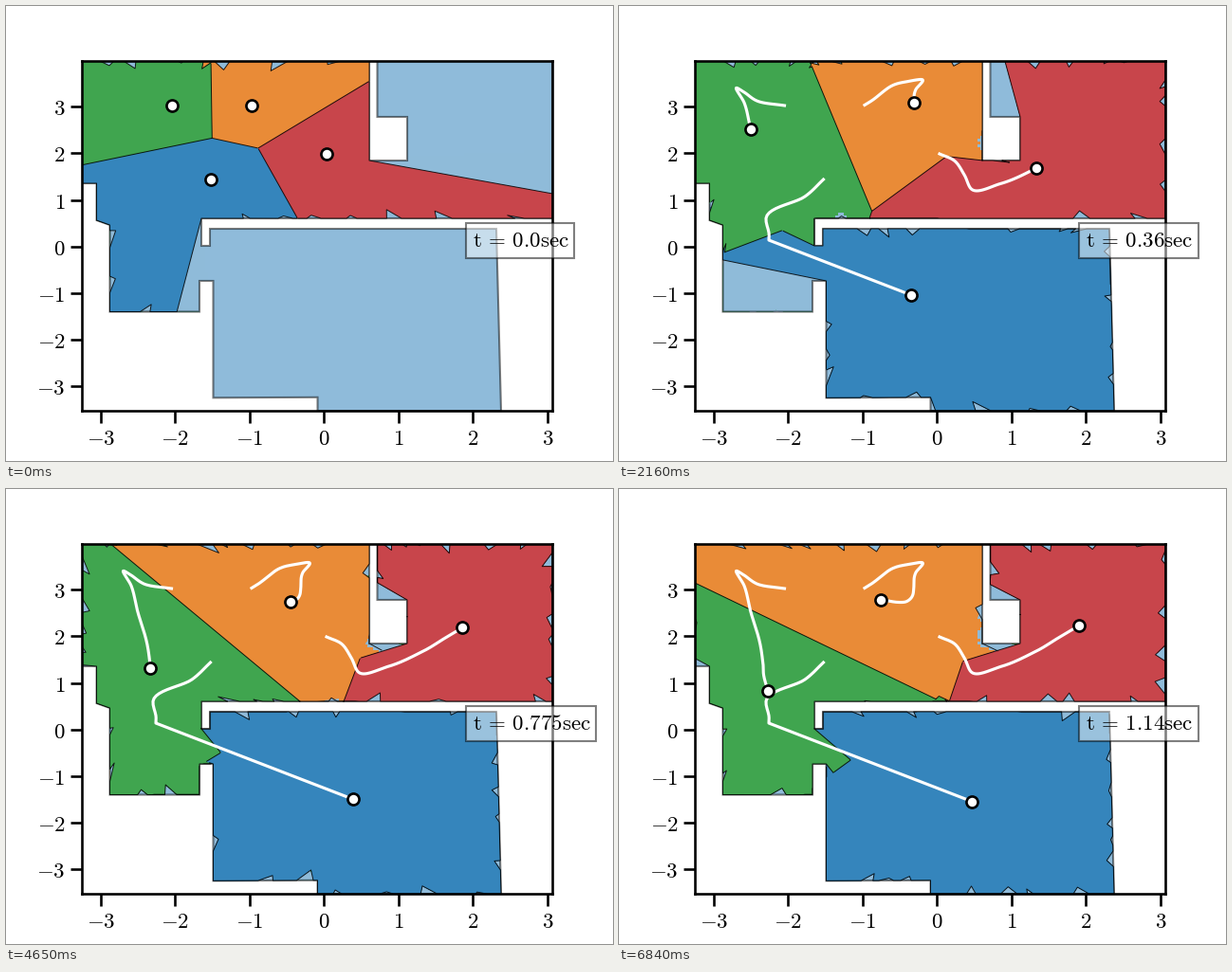
A matplotlib script that plays this animation: 640x480 px, repeating every 6.87 s.

```python
from itertools import combinations

import matplotlib.pyplot as plt
import numpy as np
from matplotlib.animation import FuncAnimation
from matplotlib.collections import PolyCollection
from matplotlib.colors import to_rgb
from matplotlib.patches import Polygon, Rectangle

plt.rcParams["mathtext.fontset"] = "cm"

FRAMES, INTERVAL, DT = 229, 30, 0.005
ORIGIN = np.array([335.3, 253.8])
UNIT = np.array([78.5, 49.2])   # pixels per data unit
LEFT, TOP, RIGHT, BOTTOM = 80, 57.6, 576, 427.2
BLUR = 0.02                     # angle lost beside each corner
STEP = 3                        # spacing of the coarse grid

ROOM = np.array([
    (LEFT, 187), (95.5, 187), (95.5, 226), (109.5, 231), (109.5, 322.5),
    (204, 322.5), (204, 290), (218.5, 290), (218.5, 413.3), (328.5, 412.8),
    (328.5, BOTTOM), (522, BOTTOM), (517, 235), (215, 235), (215, 253),
    (206, 253), (206, 224), (RIGHT, 224), (RIGHT, TOP), (391.5, TOP),
    (391.5, 117), (423, 117), (423, 163), (383, 163), (383, TOP), (LEFT, TOP)])


def mix(top, under, alpha):
    return tuple(alpha * np.array(to_rgb(top)) + (1 - alpha) * np.array(to_rgb(under)))


FLOOR = mix("tab:blue", "white", 0.5)
COLORS = [mix("tab:" + c, FLOOR, 0.8) for c in ("blue", "orange", "green", "red")]


def path(*keys):
    """Cubic Hermite curve through (step, x, y) keys, one point per step."""
    k = np.array(keys, float)
    t, xy = k[:, 0], k[:, 1:]
    slope = np.gradient(xy, t, axis=0)
    n = np.arange(FRAMES)
    i = np.clip(np.searchsorted(t, n, "right") - 1, 0, len(t) - 2)
    h = (t[i + 1] - t[i])[:, None]
    u = (n - t[i])[:, None] / h
    return ((1 + 2 * u) * (1 - u) ** 2 * xy[i] + u * (1 - u) ** 2 * h * slope[i]
            + u * u * (3 - 2 * u) * xy[i + 1] + u * u * (u - 1) * h * slope[i + 1])


def settle(curve, start, goal, tau):
    """From step start on, close in on the goal exponentially."""
    left = np.exp(-np.arange(FRAMES - start) / tau)[:, None]
    curve[start:] = goal + (curve[start] - goal) * left
    return curve


blue = settle(path((0, 215.5, 183), (9, 196, 201), (20, 155, 224),
                   (24, 158, 239), (28, 158, 247), (FRAMES, 373, 330)),
              28, np.array([373, 330]), 37)
orange = path((0, 259, 104.5), (5, 267, 99.5), (15, 287, 84.5), (25, 305, 79.5),
              (32, 319, 77.5), (45, 313, 88), (72, 311, 102), (97, 310, 111),
              (134, 304.5, 118), (177, 294.5, 119.5), (228, 275.5, 116.5))
green = path((0, 174.5, 105), (11, 148, 101), (23, 132, 91), (29, 124.5, 86.5),
             (45, 132, 102), (72, 139, 130), (97, 147, 156), (134, 151.5, 181),
             (177, 152.5, 196), (228, 157, 213))
red = path((0, 338, 156), (9, 354, 163.5), (18, 364, 178), (28, 372, 193.5),
           (45, 402, 187.5), (72, 440, 171), (97, 460, 159), (134, 476.5, 149),
           (177, 483.5, 145), (228, 484.5, 144.3))
PATHS = [blue, orange, green, red]
IDS = range(len(PATHS))

GX, GY = np.arange(LEFT, RIGHT + 1, STEP), np.arange(58, BOTTOM + 1, STEP)
GRID = np.stack(np.meshgrid(GX, GY), -1).reshape(-1, 2).astype(float)
SHAPE = len(GY), len(GX)


def cross(a, b):
    return a[..., 0] * b[..., 1] - a[..., 1] * b[..., 0]


def angle(v):
    return np.arctan2(v[..., 1], v[..., 0])


def dist2(pts, p):
    return (((pts - p) / UNIT) ** 2).sum(-1)


def cast(p, angles):
    """Distance from p to the nearest wall along each angle."""
    ray = np.stack([np.cos(angles), np.sin(angles)], 1)[:, None]
    w, edge = ROOM - p, np.roll(ROOM, -1, 0) - ROOM
    with np.errstate(divide="ignore", invalid="ignore"):
        den = cross(ray, edge[None])
        t = cross(w, edge)[None] / den
        s = cross(w[None], ray) / den
        return np.where((t > 0) & (s >= 0) & (s <= 1), t, np.inf).min(1)


def visible(p):
    """Corners of the part of the room seen from p, by rising angle."""
    a = angle(ROOM - p)
    side = np.concatenate([a - BLUR, a + BLUR])
    t = np.append(np.minimum(cast(p, a - 1e-4), cast(p, a + 1e-4)), cast(p, side))
    a = np.append(a, side)
    pts = p + t[:, None] * np.stack([np.cos(a), np.sin(a)], 1)
    pts = pts[np.isfinite(t)]
    return pts[np.argsort(angle(pts - p))]


def notched(poly, p, rng):
    """Cut small random teeth into the walls of a visible area."""
    out = []
    for a, b in zip(poly[:-1], poly[1:]):
        out.append(a)
        length = np.hypot(*(b - a))
        if length < 14 or angle(b - p) - angle(a - p) < BLUR * 1.01:
            continue
        depth = abs(cross(b - a, p - a)) / length
        s = rng.uniform(2, 30)
        while s < length - 18:
            w = rng.uniform(6, 18)
            foot = a + (b - a) * (s + w * rng.uniform(0.15, 0.85)) / length
            cut = min(rng.uniform(2, 11) / depth, w / np.hypot(*(foot - p)))
            out += [a + (b - a) * s / length, foot + (p - foot) * cut,
                    a + (b - a) * (s + w) / length]
            s += w + rng.uniform(6, 45)
    out.append(poly[-1])
    return np.array(out)


def sees(p, poly, angles, pts):
    k = np.searchsorted(angles, angle(pts - p))
    a, b = poly[k - 1], poly[k % len(poly)]
    return cross(b - a, pts - a) >= 0


def clip(poly, p, q):
    """Keep what lies nearer to p than to q."""
    if len(poly) < 3:
        return poly
    v = dist2(poly, q) - dist2(poly, p)
    nv, nxt = np.roll(v, -1), np.roll(poly, -1, 0)
    swap = (v >= 0) != (nv >= 0)
    f = np.where(swap, v / np.where(swap, v - nv, 1), 0)[:, None]
    both = np.stack([poly, poly + (nxt - poly) * f], 1)
    return both[np.stack([v >= 0, swap], 1)]


def dense(poly, step=2):
    ring = np.vstack([poly, poly[:1]])
    cum = np.append(0, np.cumsum(np.hypot(*np.diff(ring, axis=0).T)))
    s = np.sort(np.append(cum, np.arange(0, cum[-1], step)))
    return np.stack([np.interp(s, cum, ring[:, 0]),
                     np.interp(s, cum, ring[:, 1])], 1)


def spread(mask):
    out = mask.copy()
    out[1:] |= mask[:-1]
    out[:-1] |= mask[1:]
    out[:, 1:] |= mask[:, :-1]
    out[:, :-1] |= mask[:, 1:]
    return out


def flood(seed, area):
    while True:
        grown = spread(seed) & area
        if (grown == seed).all():
            return seed
        seed = grown


def cells(pos, n):
    """A spot goes to the nearest agent that sees it, if joined to its cell."""
    rng = np.random.default_rng(n)
    areas = [notched(visible(p), p, rng) for p in pos]
    angles = [angle(a - p) for a, p in zip(areas, pos)]

    def seen(i, pts):
        return sees(pos[i], areas[i], angles[i], pts)

    # reach of every cell on the coarse grid
    far = np.array([dist2(GRID, p) for p in pos])
    held = np.where([seen(i, GRID) for i in IDS], far, np.inf)
    owner = np.where(np.isfinite(held.min(0)), held.argmin(0), -1).reshape(SHAPE)
    nearest = far.argmin(0).reshape(SHAPE)
    reach = [flood((owner == i) & (nearest == i), owner == i) for i in IDS]
    lost = spread((owner >= 0) & ~np.any(reach, axis=0))
    near = [spread(r) for r in reach]

    # polygons by rank, the nearest agent's on top
    ranks = []
    for rank in IDS:
        polys, colors = [], []
        for i in IDS:
            for rivals in combinations([j for j in IDS if j != i], rank):
                poly = areas[i]
                for j in rivals:
                    poly = clip(poly, pos[i], pos[j])
                if len(poly) > 2:
                    polys.append(poly)
                    colors.append(COLORS[i])
        ranks.append((polys, colors))

    def free(i, pts, skip):
        mine = dist2(pts, pos[i])
        ok = np.ones(len(pts), bool)
        for k in IDS:
            if k not in skip:
                ok &= ~(seen(k, pts) & (dist2(pts, pos[k]) < mine))
        return ok

    def close(i, pts):
        col, row = np.rint((pts - GRID[0]) / STEP).astype(int).T
        return near[i][np.clip(row, 0, SHAPE[0] - 1), np.clip(col, 0, SHAPE[1] - 1)]

    lines = []

    def add(pts, ok):
        lines.extend([np.where(ok[:, None], pts, np.nan), [[np.nan, np.nan]]])

    for i in IDS:
        pts = dense(areas[i])
        w = pos[i] - pts
        inner = pts + 0.6 * w / np.hypot(*w.T)[:, None]
        add(pts, free(i, inner, (i,)) & close(i, inner))
    for i, j in combinations(IDS, 2):
        d = (pos[j] - pos[i]) / UNIT
        d = np.array([-d[1], d[0]]) * UNIT
        s = np.arange(-600, 600, 1.5)[:, None]
        pts = (pos[i] + pos[j]) / 2 + s * d / np.hypot(*d)
        add(pts, seen(i, pts) & seen(j, pts) & free(i, pts, (i, j))
            & (close(i, pts) | close(j, pts)))
    return ranks, lost, np.vstack(lines)


fig = plt.figure(figsize=(6.4, 4.8), dpi=100)
ax = fig.add_axes([0.125, 0.11, 0.775, 0.77])

floor = ax.add_patch(Polygon(ROOM, fc=FLOOR, ec="none", zorder=1))
fills = [ax.add_collection(PolyCollection([], linewidths=0, zorder=z), autolim=False)
         for z in (1.1, 1.11, 1.12, 1.3)]
cover = np.zeros(SHAPE + (4,))
cover[..., :3] = FLOOR
half = STEP / 2
bare = ax.imshow(cover, aspect="auto", interpolation="nearest", zorder=1.15,
                 extent=(GX[0] - half, GX[-1] + half, GY[-1] + half, GY[0] - half))
bare.set_clip_path(floor)
ax.add_patch(Polygon(ROOM, fc="none", ec=(0, 0, 0, 0.5), lw=1.5, zorder=1.2))
borders, = ax.plot([], [], color="black", alpha=0.85, lw=0.7, zorder=1.4)
trails = [ax.plot([], [], color="white", lw=2.25, zorder=2)[0] for _ in IDS]
dots, = ax.plot([], [], "o", ms=8.7, mfc="white", mec="black", mew=1.9, zorder=2.2)
box = ax.add_patch(Rectangle((485, 229), 137, 37, fc=(1, 1, 1, 0.5),
                             ec=(0, 0, 0, 0.5), lw=1.5, zorder=3, clip_on=False))
timer = ax.text(491.7, 254, "", size=16.5, zorder=4)

ax.set_xlim(LEFT, RIGHT)
ax.set_ylim(BOTTOM, TOP)
ticks = np.arange(-3, 4)
labels = [f"${k}$" for k in ticks]
ax.set_xticks(ORIGIN[0] + UNIT[0] * ticks, labels)
ax.set_yticks(ORIGIN[1] - UNIT[1] * ticks, labels)
ax.tick_params(width=1.875, length=9, pad=3.5, labelsize=16.5)
for spine in ax.spines.values():
    spine.set_linewidth(1.875)


def update(n):
    pos = [p[n] for p in PATHS]
    ranks, lost, lines = cells(pos, n)
    for fill, (polys, colors) in zip(fills, ranks):
        fill.set_verts(polys)
        fill.set_facecolor(colors)
    cover[..., 3] = lost
    bare.set_data(cover.copy())
    borders.set_data(*lines.T)
    for trail, p in zip(trails, PATHS):
        trail.set_data(*p[:n + 1].T)
    dots.set_data(*np.array(pos).T)
    clock = str(round(n * DT, 3))
    timer.set_text(rf"$\mathrm{{t}}\hspace{{0.18}}=\hspace{{0.18}}"
                   rf"\mathrm{{{clock}sec}}$")
    box.set_width(137.3 - 11.45 * (5 - len(clock)))
    return [*fills, bare, borders, *trails, dots, box, timer]


anim = FuncAnimation(fig, update, frames=FRAMES, interval=INTERVAL,
                     init_func=lambda: update(0), repeat=True, repeat_delay=0)
plt.show()
```
